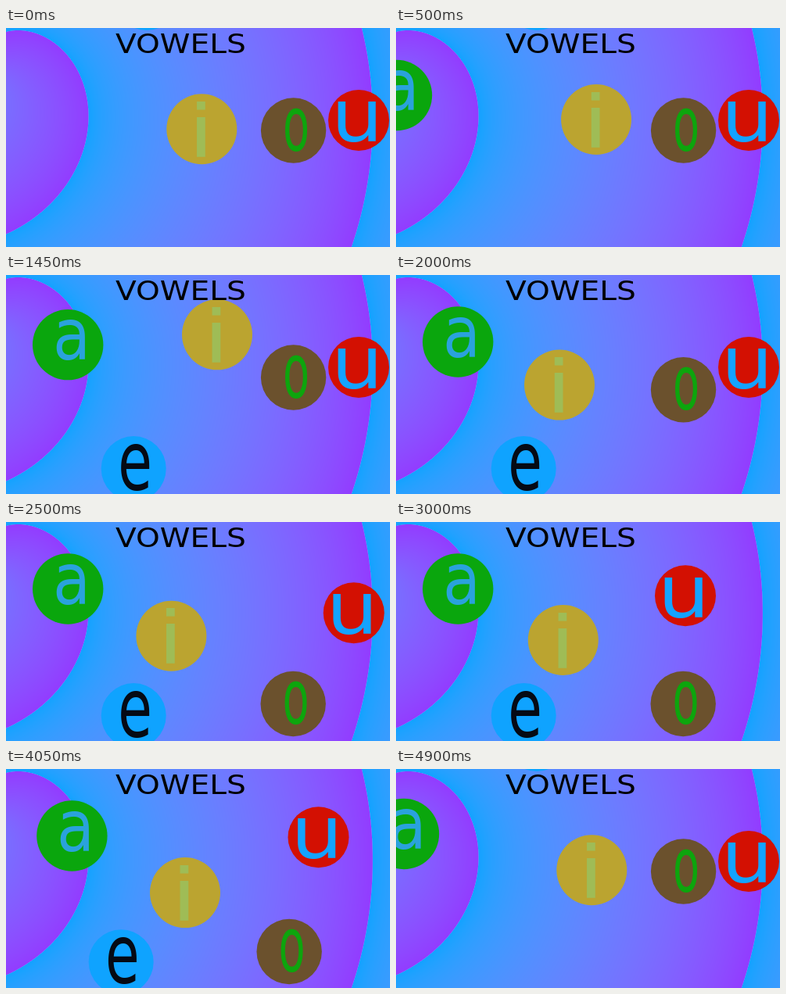
These frames come from a looping animation (491x280 px, 4950 ms). An HTML page with a canvas:

```html
<!DOCTYPE html>
<html lang="en">
<head>
<meta charset="utf-8">
<title>Vowels</title>
<style>
  html, body { margin: 0; width: 100%; height: 100%; overflow: hidden; }
  canvas, svg { position: absolute; left: 0; top: 0; display: block; }
  text { font-family: "DejaVu Sans", sans-serif; }
</style>
</head>
<body>
<canvas id="bg" width="491" height="280"></canvas>
<svg id="stage" width="491" height="280" viewBox="0 0 491 280">
  <g id="balls"></g>
  <text transform="translate(140 32) scale(1.15 1)" font-size="34">VOWELS</text>
</svg>
<script>
const LOOP = 4950, STEP = 50;
// Balls come in one after another, drift together, then leave in reverse order
const START = 290, SLOT = 542, DRIFT = START + 5 * SLOT;
const LEAVE = 4375, EXIT = 115;

// Poses: home -> (wait) -> (land) -> place -> rest -> home
// glyph: x offset, baseline, size, horizontal scale
const balls = [
  { ch: 'a', r: 45.2, fill: '#0aa60d', ink: '#2aa2dc', glyph: [4.7, 19, 90, 0.87],
    home: [-48.5, 81], land: [79.2, 94], place: [79.2, 85.5], rest: [86, 85.5] },
  { ch: 'e', r: 41.5, fill: '#0fa3ff', ink: '#050a14', glyph: [1.8, 27, 106, 0.67],
    home: [180, -38.5], place: [163.2, 247.5], rest: [142.2, 246.5] },
  { ch: 'i', r: 45, fill: '#bba430', ink: '#9fbc56', glyph: [-1, 35.5, 92, 1.3],
    home: [250.3, 129.3], wait: [280, 66], land: [208.6, 139.7], place: [213.8, 151], rest: [233.7, 160.3] },
  { ch: 'o', r: 41.7, fill: '#6b512d', ink: '#0da50d', glyph: [3.4, 25.5, 96, 0.58],
    home: [367.6, 131], place: [367.2, 232.5], rest: [360.6, 233.8] },
  { ch: 'u', r: 39, fill: '#d31002', ink: '#14a3ff', glyph: [-1.9, 27.3, 92, 1.14],
    home: [451, 118], place: [370, 94.3], rest: [408.6, 85] }
];

const ramp = (t, from, span) => Math.min(1, Math.max(0, (t - from) / span));
const mix = (p, q, k) => p.map((v, i) => v + (q[i] - v) * k);

function poseAt(ball, order, t) {
  const { home, place, rest, wait = home, land = place } = ball;
  const enter = START + order * SLOT;
  if (t < enter) return mix(home, wait, ramp(t, START, enter - START || 1));
  if (t < enter + SLOT) return mix(wait, land, ramp(t, enter, SLOT));
  if (t < DRIFT) return mix(land, place, ramp(t, enter + SLOT, 2 * SLOT));
  if (t < LEAVE) return mix(place, rest, ramp(t, DRIFT, LEAVE - DRIFT));
  return mix(rest, home, ramp(t, LEAVE + (balls.length - 1 - order) * EXIT, EXIT));
}

// Spiral gradient blended in linear light, wrapping hard from violet to cyan
function paintSpiral(canvas) {
  const { width: w, height: h } = canvas;
  const ctx = canvas.getContext('2d');
  const img = ctx.createImageData(w, h);
  const cx = -30, cy = 58, pitch = 59.2, start = 122.9, gamma = 2.2;
  const turn = pitch * 2 * Math.PI;
  const [cyan, violet] = [[15, 163, 255], [146, 60, 255]].map(c => c.map(v => v ** gamma));
  for (let y = 0, p = 0; y < h; y++) {
    for (let x = 0; x < w; x++, p += 4) {
      const dx = x + 0.5 - cx, dy = y + 0.5 - cy;
      const d = Math.hypot(dx, dy) - start - pitch * Math.atan2(dy, dx);
      const past = d - Math.floor(d / turn) * turn;
      const k = past < 1 ? 1 - past : past / turn;
      mix(cyan, violet, k).forEach((v, c) => { img.data[p + c] = v ** (1 / gamma); });
      img.data[p + 3] = 255;
    }
  }
  ctx.putImageData(img, 0, 0);
}

function make(tag, attrs, parent) {
  const el = document.createElementNS('http://www.w3.org/2000/svg', tag);
  for (const name in attrs) el.setAttribute(name, attrs[name]);
  return parent.appendChild(el);
}

function build(ball) {
  const [dx, base, size, sx] = ball.glyph;
  ball.el = make('g', {}, document.getElementById('balls'));
  make('circle', { r: ball.r, fill: ball.fill }, ball.el);
  make('text', {
    transform: `translate(${dx} ${base}) scale(${sx} 1)`,
    'font-size': size, 'text-anchor': 'middle', fill: ball.ink
  }, ball.el).textContent = ball.ch;
}

function draw(t) {
  balls.forEach((ball, order) => {
    ball.el.setAttribute('transform', `translate(${poseAt(ball, order, t).join(' ')})`);
  });
}

paintSpiral(document.getElementById('bg'));
balls.forEach(build);
draw(0);

let origin = null;
function tick(now) {
  if (origin === null) origin = now;
  const t = Math.max(0, now - origin) % LOOP;
  draw(Math.floor(t / STEP) * STEP);
  requestAnimationFrame(tick);
}
requestAnimationFrame(tick);
</script>
</body>
</html>
```
